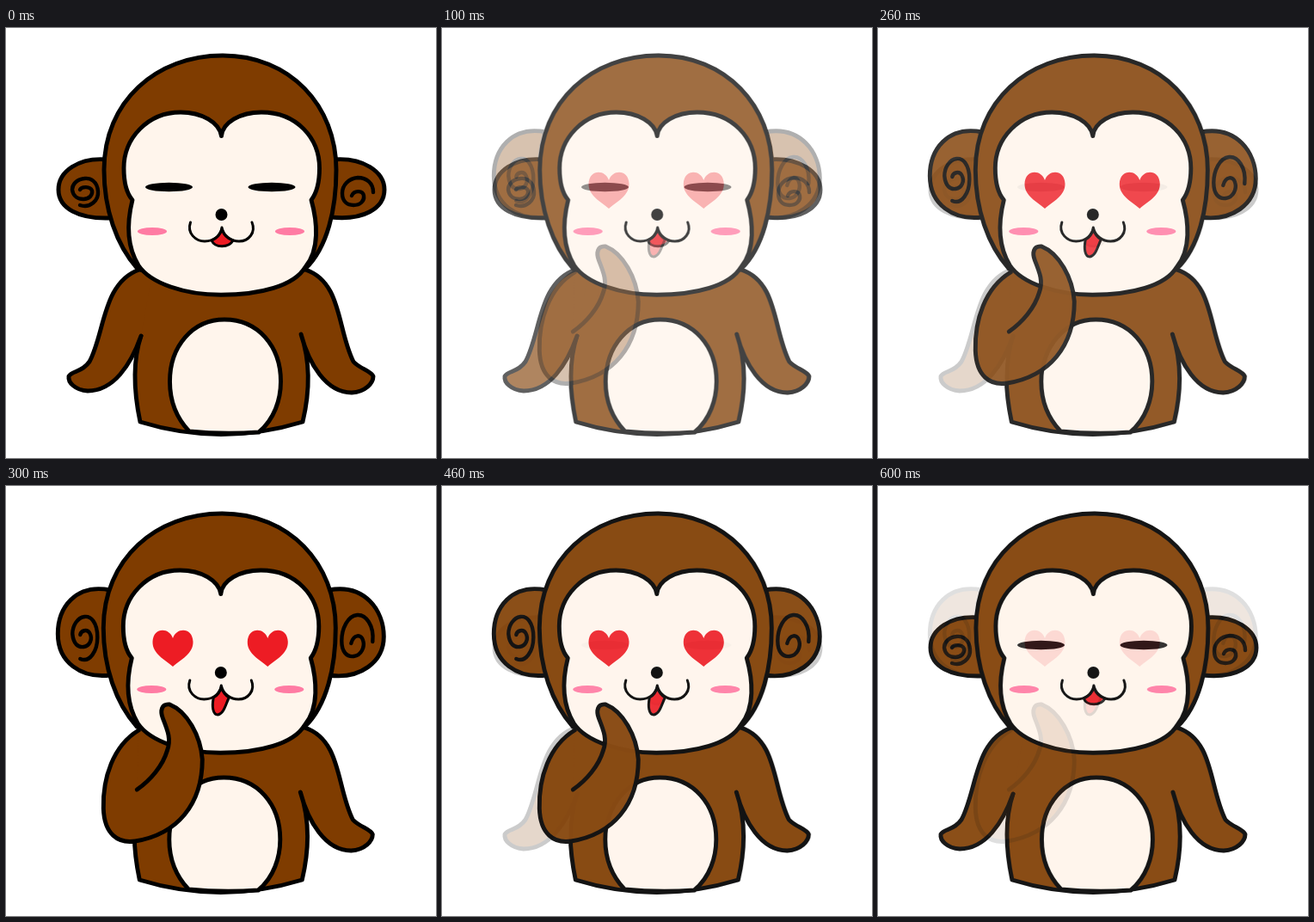
An HTML page for the animation above (0.7 s loop, 500 by 500 pixels).

```html
<!DOCTYPE html>
<html lang="en">
<head>
<meta charset="utf-8">
<title>Monkey in love</title>
<style>
  html, body { margin: 0; width: 100%; height: 100%; overflow: hidden; background: #fff; }
  svg { display: block; width: 100vw; height: 100vh; }
  .line { stroke: #000; stroke-width: 4.9; stroke-linecap: round; stroke-linejoin: round; }
  .thin { stroke-width: 3; }
  .fur { fill: #7f3c00; }
  .skin { fill: #fff5ec; }
  .red { fill: #ed1c24; }
  .pink { fill: #ff7ba3; }
  .open { fill: none; stroke-width: 4.4; }
  .open.thin { stroke-width: 3; }
</style>
</head>
<body>
<svg viewBox="0 0 500 500">
  <defs>
    <g id="torso">
      <path class="line fur" d="M157 358C148 385 148 420 156 458Q250 487 345 458C354 420 353 385 343 356C352 390 372 424 402 424C418 423 427 413 427 405C425 399 411 396 404 388C385 351 391 295 348 281L155 281"/>
      <path class="line skin" d="M213 469C195 450 190.500 430 190.500 411C190.500 370 217 339 254 339C293 339 319.500 370 319.500 411C319.500 432 312 455 294 470Q253 473 213 469"/>
    </g>
    <g id="head">
      <path class="line fur" d="M153 280C128 252 114 210 114 165C114 85 175 32 252 32C330 32 384 90 384 165C384 210 374 255 348 280"/>
      <path class="line skin" d="M250.500 125.500C248 110 228 98 203 98C165 98 137 128 137 163C137 180 140 192 147 200C139 232 143 258 154 276C168 297 208 310.300 250 310.300C295 310.300 335 300 348 278C365 258 362 225 355 200C361 192 364.500 180 364.500 163C364.500 128 338 98 297 98C272 98 252 110 250.500 125.500"/>
      <g class="pink">
        <ellipse cx="170" cy="236.500" rx="17" ry="4.600"/>
        <ellipse cx="330" cy="236.500" rx="17" ry="4.600"/>
      </g>
      <circle cx="250.500" cy="217" r="7"/>
      <path class="line thin open" d="M214.500 226C210 239 221 248 231 248C243 248 250 240 251 232C253 242 262 248 271 248C282 248 291 238 286 226"/>
    </g>
    <path id="heart" class="red" d="M194 177C190 164 171 164 170.500 181C170 195 185 202 194 210C203 202 218 195 217.500 181C217 164 198 164 194 177"/>
  </defs>

  <g id="calm">
    <g class="line fur">
      <path d="M118 153C84 150 61 167 61 188C61 210 85 222 120 221"/>
      <path d="M380 153C415 150 440 167 440 188C440 210 415 224 378 220"/>
    </g>
    <g class="line open">
      <path d="M86 206C98 210 108 200 107 190C106 178 98 174 91 175C82 176 77 182 77 188C78 196 84 199 90 199C97 199 101 194 100 189C98 184 88 184 86 188"/>
      <path d="M427 191C427 180 419 174 409 174C398 175 391 183 391 192C391 202 397 206 404 206C412 206 417 201 416 195C415 189 405 188 402 195"/>
    </g>
    <use href="#torso"/>
    <path class="line fur" d="M157 358C145 392 125 422 95 422C80 421 72 412 73 405C77 398 88 401 97 388C115 355 112 296 155 281L170 285"/>
    <use href="#head"/>
    <ellipse cx="189.500" cy="185" rx="27.500" ry="5.200"/>
    <ellipse cx="309" cy="185" rx="27.500" ry="5.200"/>
    <path class="line thin red" d="M251 234C249 241 244 245 239 247C243 256 259 256 264 247C257 245 253 240 251 234Z"/>
  </g>

  <g id="love" transform="translate(-.7)">
    <g class="line fur">
      <path d="M122 121C81 113 61 142 61 172C61 205 88 224 122 220"/>
      <path d="M376 121C418 113 440 145 440 175C440 205 412 225 376 220"/>
    </g>
    <g class="line open">
      <path d="M87 201C98 206 107 192 107 176C107 158 99 151 92 152C84 153 78 162 78 172C79 184 85 188 91 187C98 186 102 178 98 171C95 166 88 168 87 173"/>
      <path d="M427 181C429 162 419 149 409 150C398 151 391 166 391 180C391 193 397 199 405 198C414 197 418 187 416 180C414 172 405 172 402 183"/>
    </g>
    <use href="#torso"/>
    <path class="fur" d="M152 283h30v75h-32z"/>
    <use href="#head"/>
    <path class="line fur" d="M155 284C125 302 113 340 114 375C115 405 131 416 151 413C200 405 229 370 229 318C227 290 211 262 191 254C181 253 180 262 183 270C189 285 193 295 188 308C183 325 169 342 153 353"/>
    <use href="#heart" x=".7"/>
    <use href="#heart" x="111"/>
    <path class="line thin red" d="M251 234C249 241 246 244 242 246C240 256 241 266 247 266C254 265 256 254 260 246C255 243 253 240 251 234Z"/>
  </g>
</svg>
<script>
  // Opacity of each pose, held for one step; the love pose lies on top.
  const STEP = 100;
  const calm = [1, .62, .2, 0, .2, .7, .9];
  const love = [0, .31, .8, 1, .9, .31, .12];
  const fade = (id, value) => document.getElementById(id).setAttribute('opacity', value);
  const start = performance.now();

  function draw(now) {
    const i = Math.floor(Math.max(0, now - start) / STEP) % calm.length;
    fade('calm', calm[i]);
    fade('love', love[i]);
    requestAnimationFrame(draw);
  }
  draw(start);
</script>
</body>
</html>
```
